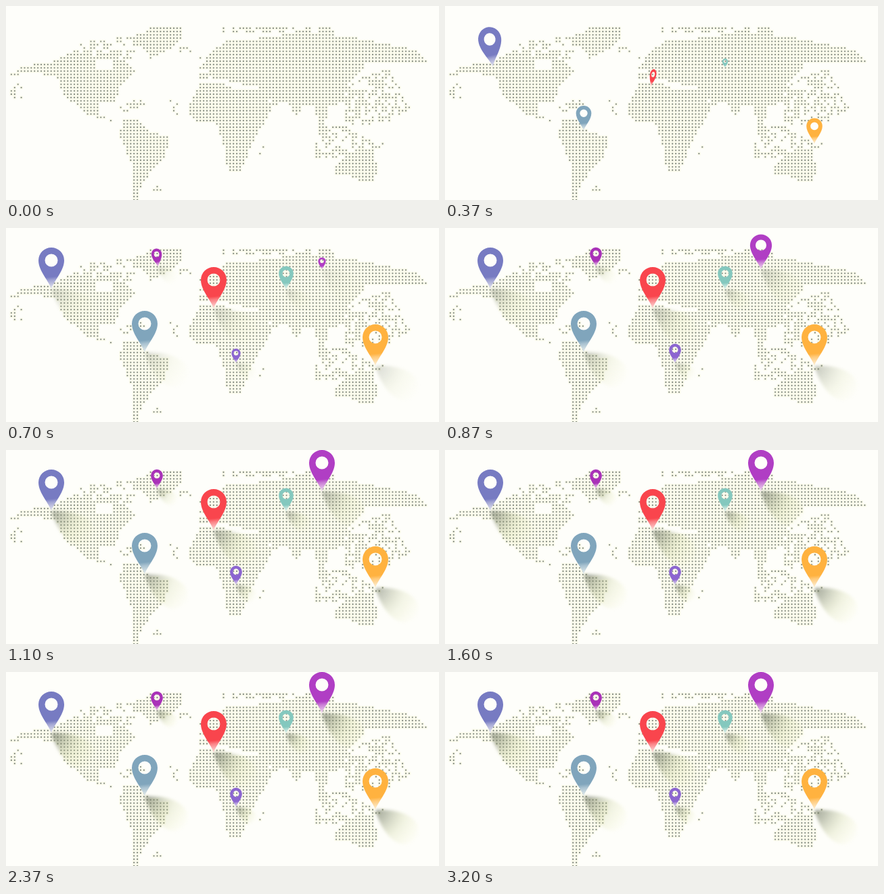
An HTML page with a canvas that plays this animation: 640 px wide and 288 px high, repeating every 3.63 s.

```html
<!DOCTYPE html>
<html lang="en">
<head>
<meta charset="utf-8">
<title>World map pins</title>
<style>
  html, body { margin: 0; width: 100%; height: 100%; overflow: hidden; background: #fefefa; }
  canvas { display: block; width: 640px; height: 288px; }
</style>
</head>
<body>
<canvas id="stage" width="640" height="288"></canvas>
<script>
const W = 640, H = 288, LOOP = 3630, PITCH = 4.9, PAPER = '#fefefa';
const g = document.getElementById('stage').getContext('2d');

// Rough coastlines; the dot grid turns them into stepped shores
const land = {
  northAmerica: 'M2 104L26 88 66 85 94 69 172 78 194 96 168 122 162 144 136 146 138 162 164 174 122 162 82 130 80 108 44 99Z',
  hudsonBay: 'M134 80L156 82 158 94 132 94Z',
  greenland: 'M216 31L258 31 262 48 246 62 214 78 198 57 180 48 204 38Z',
  southAmerica: 'M172 169L198 170 214 186 243 194 236 222 214 246 198 270 197 290 186 290 186 234 167 192Z',
  africa: 'M288 113L314 113 340 124 382 124 394 150 364 206 348 245 328 245 320 198 310 174 284 172 271 160 271 144Z',
  eurasia: 'M283 110L283 97 300 97 290 86 304 66 330 50 384 47 440 36 520 48 604 64 624 84 536 82 504 120 500 142 476 150 470 196 460 190 458 148 440 146 428 166 414 140 394 150 383 124 330 112 304 106Z',
  australia: 'M484 250L490 232 520 213 538 210 549 234 546 260 522 260 506 250Z'
};

// Island groups, thinned out by chance
const isles = {
  arctic: 'M92 74L110 54 200 38 200 54 184 78Z',
  polar: 'M318 31L486 31 486 40 318 38Z',
  north: 'M283 92L286 70 293 74 293 92ZM255 62L273 62 273 68 255 68Z',
  aleutian: 'M0 126L26 108 26 138 0 140Z',
  atlantic: 'M168 151L196 136 206 146 180 160ZM232 138L254 138 254 164Z',
  south: 'M216 262L229 264 229 277 208 285ZM371 226L376 203 384 206Z',
  pacific: 'M500 118L566 90 598 152 566 173 500 178Z',
  sunda: 'M472 178L502 178 558 204 545 216 454 230 454 206Z'
};

let seed = 11;
const rand = () => (seed = seed * 16807 % 2147483647) / 2147483647;
const join = shapes => new Path2D(Object.values(shapes).join(''));

function makeMap() {
  const canvas = document.createElement('canvas');
  canvas.width = W;
  canvas.height = H;
  const m = canvas.getContext('2d');
  const solid = join(land), loose = join(isles);
  m.fillStyle = PAPER;
  m.fillRect(0, 0, W, H);
  for (let y = 33; y < H; y += PITCH) {
    for (let x = 3; x < W; x += PITCH) {
      const chance = rand() < .58;
      const on = m.isPointInPath(solid, x, y, 'evenodd') ||
        (chance && m.isPointInPath(loose, x, y));
      if (!on) continue;
      m.fillStyle = 'rgba(240,240,180,.2)';
      m.fillRect(x - PITCH / 2, y - PITCH / 2, PITCH, PITCH);
      m.fillStyle = '#868d82';
      m.beginPath();
      m.arc(x, y, 1.15, 0, 7);
      m.fill();
    }
  }
  return canvas;
}

// Pin shape with its tip at 0,0
const PIN_MIDDLE = 35;
const pinPath = new Path2D(
  'M0 0C-3-12-19-27-19-43A19 19 0 0 1 19-43C19-27 3-12 0 0Z' +
  'M9.5-43A9.5 9.5 0 1 0-9.5-43A9.5 9.5 0 1 0 9.5-43Z');
const shadePath = new Path2D('M0 0C-7-8-23-32-21-52A21 21 0 0 1 21-52C23-32 7-8 0 0Z');

const pins = [
  { x: 67, y: 91, size: 1, color: '#777bc2', start: 30, move: spin },
  { x: 205, y: 185, size: 1, color: '#80a5bc', start: 187, move: pop },
  { x: 546, y: 205, size: 1, color: '#ffb23f', start: 180, move: pop },
  { x: 307, y: 120, size: 1, color: '#f9454d', start: 190, move: spin },
  { x: 414, y: 92, size: .57, color: '#84c8be', start: 250, move: pop },
  { x: 223, y: 58, size: .47, color: '#a932b8', start: 370, move: spin },
  { x: 340, y: 201, size: .47, color: '#8c66d0', start: 470, move: pop },
  { x: 467, y: 62, size: 1, color: '#b03ec4', start: 610, move: pop }
];

const clamp = v => Math.max(0, Math.min(1, v));

function pop(age) {
  const p = clamp(age / 400);
  const s = p < .8 ? 1.3 * p : 1.04 - .2 * (p - .8);
  return { sx: s, sy: s, tilt: 0 };
}

// Grows while turning about the upright axis and rocking once
function spin(age) {
  const p = clamp(age / 450);
  const s = (1 - Math.cos(Math.PI * p)) / 2 + .2 * p * Math.sin(Math.PI * p);
  const rock = Math.sin(2 * Math.PI * Math.max(0, p - .16) / .84);
  return {
    sx: s * Math.sin(Math.PI / 2 * p),
    sy: s,
    tilt: rock * (.27 - .2 * p)
  };
}

function drawShade({ x, y, size, start }, t) {
  const from = Math.max(470, start);
  const q = clamp((t - from) / (1970 - from));
  if (!q) return;
  const fade = g.createRadialGradient(0, 0, 2, 0, 0, 72);
  fade.addColorStop(0, 'rgba(105,112,95,.62)');
  fade.addColorStop(.25, 'rgba(132,140,108,.45)');
  fade.addColorStop(.6, 'rgba(198,206,145,.24)');
  fade.addColorStop(1, 'rgba(235,238,165,.04)');
  g.save();
  g.translate(x, y);
  g.scale(size, size);
  g.rotate(125 * Math.PI / 180);
  g.globalAlpha = 1 - (1 - q) ** 3;
  g.filter = 'blur(2px)';
  g.fillStyle = fade;
  g.fill(shadePath);
  g.restore();
}

function drawPin({ x, y, size, color, start, move }, t) {
  if (t <= start) return;
  const { sx, sy, tilt } = move(t - start);
  const paint = g.createLinearGradient(-3, -62, 3, 0);
  paint.addColorStop(0, color);
  paint.addColorStop(.7, color);
  paint.addColorStop(.78, color + 'ad');
  paint.addColorStop(1, color + '1f');
  g.save();
  g.translate(x, y - PIN_MIDDLE * size * sy);
  g.rotate(tilt);
  g.scale(sx * size, sy * size);
  g.translate(0, PIN_MIDDLE);
  g.fillStyle = PAPER;
  g.fill(pinPath, 'evenodd');
  g.fillStyle = paint;
  g.fill(pinPath, 'evenodd');
  g.restore();
}

const map = makeMap();
const begin = performance.now();

function frame() {
  const t = (performance.now() - begin) % LOOP;
  g.drawImage(map, 0, 0);
  pins.forEach(pin => drawShade(pin, t));
  pins.forEach(pin => drawPin(pin, t));
  requestAnimationFrame(frame);
}
frame();
</script>
</body>
</html>
```
